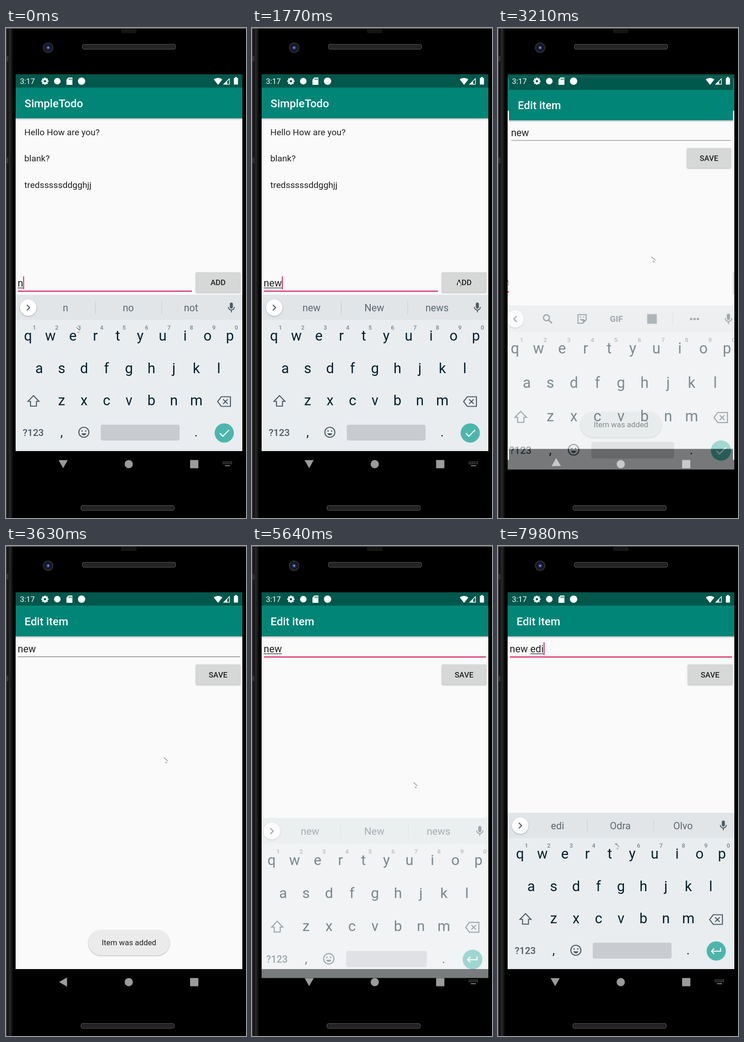
Write an HTML page with a canvas that moves like this. It is 524 px wide and 1069 px high and loops after 8 s.

```html
<!DOCTYPE html>
<html lang="en">
<head>
<meta charset="utf-8">
<title>Todo list demo</title>
<style>
html, body { margin: 0; width: 100%; height: 100%; overflow: hidden; background: #000; }
canvas { display: block; width: 524px; height: 1069px; }
</style>
</head>
<body>
<canvas id="stage" width="524" height="1069"></canvas>
<script>
const W = 524, H = 1069, LOOP = 8000, STEP = 133;
const CX = 268.5, CY = 541, KEYBOARD_Y = 111, PITCH = 49;
const INK = '#212121', KEY = '#06202c', ICON = '#4c5a63', PINK = '#d81b60', NAV = '#9b9b9b';
const ROWS = ['qwertyuiop', 'asdfghjkl', 'zxcvbnm'];

const sheet = Object.assign(document.createElement('canvas'), { width: W, height: H }).getContext('2d');
let c = document.getElementById('stage').getContext('2d');

const clamp = v => Math.max(0, Math.min(1, v));
const last = (list, t) => list.filter(e => e[0] <= t).pop();
const keyX = (row, i) => CX + PITCH * (i - (row.length - 1) / 2);

// Where the pointer rests while pressing a key.
function at(key) {
  const r = ROWS.findIndex(row => row.includes(key));
  return [keyX(ROWS[r], ROWS[r].indexOf(key)) - 4, 665 + 71 * r];
}

const addSpot = [450, 552], itemSpot = [201, 405], fieldSpot = [404, 234], spaceSpot = [288, 868];
const stops = [[0, [153, 653]], [260, at('e')], [530, at('w')], [1060, addSpot], [2040, addSpot],
  [2700, itemSpot], [2930, itemSpot], [3192, [335, 499]], [4880, fieldSpot], [5100, fieldSpot],
  [6150, spaceSpot], [6780, [130, 660]], [6920, at('e')], [7280, at('d')], [7700, at('i')],
  [LOOP - 20, [256, 649]]];

// Typing: [ms, settled text, composing text, suggestions]
const addInput = [[0, '', 'n', 'n no not'], [260, '', 'ne', 'ne new need'],
  [530, '', 'new', 'new New news'], [2030, '', '', '']];
const editInput = [[0, 'new', '', 'new New news'], [5040, '', 'new', 'new New news'],
  [6150, 'new ', '', 'phone one job'], [6870, 'new ', 'e', 'e every email'],
  [7280, 'new ', 'ed', 'ed edit edition'], [7700, 'new ', 'edi', 'edi Odra Olvo']];

function pointer(t) {
  const i = Math.max(1, stops.findIndex(s => s[0] >= t));
  const [t0, a] = stops[i - 1], [t1, b] = stops[i];
  const k = clamp((t - t0) / (t1 - t0)), e = k * k * (3 - 2 * k);
  return a.map((v, j) => v + (b[j] - v) * e);
}

function rect(x, y, w, h, color, r = 0) {
  c.fillStyle = color;
  c.beginPath();
  c.roundRect(x, y, w, h, r);
  c.fill();
}

function dot(x, y, r, color) {
  c.fillStyle = color;
  c.beginPath();
  c.arc(x, y, r, 0, 7);
  c.fill();
}

function arc(x, y, r, color, w, from = 0, to = 7) {
  c.strokeStyle = color;
  c.lineWidth = w;
  c.beginPath();
  c.arc(x, y, r, from, to);
  c.stroke();
}

function trace(pts, closed) {
  c.beginPath();
  for (let i = 0; i < pts.length; i += 2) c.lineTo(pts[i], pts[i + 1]);
  if (closed) c.closePath();
}

function poly(pts, color) {
  trace(pts, true);
  c.fillStyle = color;
  c.fill();
}

function line(pts, color, w, closed) {
  trace(pts, closed);
  c.strokeStyle = color;
  c.lineWidth = w;
  c.stroke();
}

function chevron(x, y, dir) {
  line([x - 3 * dir, y - 6, x + 3 * dir, y, x - 3 * dir, y + 6], ICON, 2.2);
}

function text(s, x, y, size, color, weight = 400, align = 'left') {
  c.font = `${weight} ${size}px Roboto, sans-serif`;
  c.textAlign = align;
  c.fillStyle = color;
  c.fillText(s, x, y);
  return c.measureText(s).width;
}

function shaded(draw) {
  c.save();
  c.shadowColor = 'rgba(0,0,0,.3)';
  c.shadowBlur = 3;
  c.shadowOffsetY = 1;
  draw();
  c.restore();
}

// Draws a whole window, scaled about (CX, cy), and blends it as one piece.
function layer(scale, cy, alpha, draw) {
  const main = c;
  c = sheet;
  c.clearRect(0, 0, W, H);
  c.save();
  c.translate(CX, cy);
  c.scale(scale, scale);
  c.translate(-CX, -cy);
  draw();
  c.restore();
  c = main;
  c.globalAlpha = alpha;
  c.drawImage(sheet.canvas, 0, 0);
  c.globalAlpha = 1;
}

function speaker(x, y) {
  rect(x, y, 205, 12, '#4b4b4b', 5);
  rect(x + 1.5, y + 1.5, 202, 9, '#1c1c1c', 4);
  for (let i = 6; i < 200; i += 3) rect(x + i, y + 3, 1, 6, '#353535');
}

function phone() {
  rect(0, 0, W, H, '#000');
  const edge = c.createLinearGradient(0, 0, 16, 0);
  ['#2c2c2c', '#101010', '#2a2a2a', '#191919', '#000'].forEach((col, i) => edge.addColorStop(i / 4, col));
  rect(0, 0, 16, H, edge);
  for (const y of [61, 283]) rect(0, y, 5, 12, '#333');
  rect(0, 0, W, 1.2, '#7c7c7c');
  rect(0, 0, 1, H, '#555');
  rect(251, 2, 34, 9, '#151515', 3);
  ['#29292b', '#10131f', '#1d2a57', '#7f95d8'].forEach((col, i) => dot(92, 43, 11.5 - 3.1 * i, col));
  speaker(166, 35);
  speaker(163, 1041);
}

function statusIcons() {
  const w = '#fff', bar = '#00574b';
  text('3:17', 30.5, 122, 16.8, w);
  for (let i = 0; i < 4; i++) {
    c.save();
    c.translate(85, 116);
    c.rotate(i * Math.PI / 4);
    rect(-1.9, -7.8, 3.8, 15.6, w, 1);
    c.restore();
  }
  arc(85, 116, 4.2, w, 3.4);
  dot(85, 116, 2.5, bar);
  dot(112, 116, 7.2, w);
  poly([136.5, 108, 145, 108, 145, 124, 132, 124, 132, 112.5], w);
  for (let x = 137; x < 144; x += 2.7) rect(x, 110, 1.4, 3.6, bar);
  dot(165, 116, 8, w);
  c.beginPath();
  c.moveTo(463, 124);
  c.arc(463, 124, 15, -2.25, -0.89);
  c.fill();
  line([475.5, 122.7, 487.7, 122.7, 487.7, 110.5], w, 1.5, true);
  poly([475, 123, 483, 115, 483, 123], w);
  rect(497.5, 109, 9, 14.5, w, 1);
  rect(500, 107, 4, 3, w);
}

function page(title) {
  rect(21, 101, 495, 880, '#000');
  rect(21, 101, 495, 822, '#fafafa');
  rect(21, 101, 495, 30, '#00574b');
  rect(21, 130, 495, 67.3, '#008577');
  const g = c.createLinearGradient(0, 197, 0, 202);
  g.addColorStop(0, 'rgba(0,0,0,.2)');
  g.addColorStop(1, 'rgba(0,0,0,0)');
  rect(21, 197.3, 495, 5, g);
  text(title, 40.6, 173, 24.1, '#fff', 500);
}

function button(label, y) {
  shaded(() => rect(414.5, y, 97, 44, '#d6d7d7', 2));
  text(label, 463, y + 28, 16.84, INK, 500, 'center');
}

function field([since, done, typing], t, base, right, focused) {
  const start = 25.5 + text(done, 25.5, base, 21.66, INK);
  const end = start + text(typing, start, base, 21.66, INK);
  if (typing) rect(start, base + 2.5, end - start, 1.3, INK);
  rect(26, base + 9, right - 26, focused ? 2.3 : 1.2, focused ? PINK : '#6f6f6f');
  if (focused && (t - since) % 1000 < 500) rect(end, base - 22, 2, 28, PINK);
}

function listPage(t) {
  page('SimpleTodo');
  const items = ['Hello How are you?', 'blank?', 'tredsssssddgghjj'];
  if (t >= 2030) items.push('new');
  items.forEach((s, i) => text(s, 40, 233.7 + 57.75 * i, 19.25, INK));
  const input = last(addInput, t);
  if (!input[2]) text('Add an Item Here!', 25.5, 564, 21.66, '#999');
  field(input, t, 564, 406, true);
  button('ADD', 533);
}

function editPage(t) {
  page('Edit item');
  field(last(editInput, t), t, 232, 511, t >= 5040);
  button('SAVE', 258.5);
}

function smile(x, y, r) {
  dot(x - 0.36 * r, y - 0.27 * r, 0.15 * r, ICON);
  dot(x + 0.36 * r, y - 0.27 * r, 0.15 * r, ICON);
  c.beginPath();
  c.arc(x, y + 0.1 * r, r / 2, 0.2, 2.94);
  c.fill();
}

function toolbar() {
  arc(113.5, 607.5, 6.2, ICON, 2.5);
  line([118, 612, 125, 619], ICON, 2.8);
  line([179, 601, 196, 601, 196, 612, 189, 619, 179, 619], ICON, 2.2, true);
  poly([189, 619, 189, 612, 196, 612], ICON);
  smile(187.5, 608.5, 9);
  text('GIF', 259, 616, 18, ICON, 700, 'center');
  rect(323, 600, 20, 20, '#66737b', 1);
  rect(376, 596, 1, 28, '#c3c9cd');
  for (let i = -1; i < 2; i++) dot(421.5 + 7 * i, 610, 2.5, ICON);
}

function strip(words) {
  rect(21, 582, 495, 55, '#e1e5e8');
  shaded(() => dot(48.5, 610, 18, '#fff'));
  chevron(48.5, 610, words ? 1 : -1);
  if (words) {
    words.split(' ').forEach((s, i) => text(s, 130 + 137 * i, 618, 21.5, '#5b6870', 400, 'center'));
    for (const x of [194.5, 339.5]) rect(x, 596, 1, 29, '#c3c9cd');
  } else toolbar();
  rect(488.7, 599, 6.6, 13, ICON, 3.3);
  arc(492, 608.5, 6.7, ICON, 2, 0, Math.PI);
  rect(491, 615, 2, 5.5, ICON);
}

function keyboard(words, enter) {
  rect(21, 582, 495, 341, '#e9edf0');
  strip(words);
  ROWS.forEach((row, r) => [...row].forEach((k, i) =>
    text(k, keyX(row, i), Math.round(682 + 70.7 * r), 31, KEY, 400, 'center')));
  for (let i = 0; i < 10; i++) text((i + 1) % 10, 62 + PITCH * i, 658, 13, '#7b868d', 500, 'center');

  line([60, 802, 72, 814.5, 66.5, 814.5, 66.5, 825, 53.5, 825, 53.5, 814.5, 48, 814.5], ICON, 2.2, true);
  line([470, 804.5, 490, 804.5, 490, 825.5, 470, 825.5, 462, 815], ICON, 2.2, true);
  for (const d of [-5, 5]) line([479 - d, 810, 479 + d, 820], ICON, 2.2);

  text('?123', 59.5, 890, 21, ICON, 500, 'center');
  text(',', 121.5, 891, 27, KEY, 400, 'center');
  text('.', 415, 891, 27, KEY, 400, 'center');
  arc(170, 882, 11, ICON, 2.2);
  smile(170, 882, 11);
  rect(207, 865.5, 172, 34.5, '#c8ccd0', 4);
  dot(476.5, 883.5, 21, '#4db6ac');
  if (enter) {
    line([486, 877, 486, 884, 467, 884], '#fff', 2.2);
    line([472, 878, 466, 884, 472, 890], '#fff', 2.2);
  } else line([467, 884, 473.5, 890.5, 487, 877], '#fff', 2.4);
}

function toast() {
  shaded(() => rect(180, 838, 177, 55, '#ebebeb', 27.5));
  text('Item was added', CX, 871, 16.84, INK, 400, 'center');
}

// turn 0: back arrow, turn 1: arrow pointing down
function navigation(turn, withSwitch, color) {
  c.save();
  c.translate(124.8, 951.3);
  c.rotate(-turn * Math.PI / 2);
  poly([-9, 0, 8.5, -10, 8.5, 10], color);
  c.restore();
  dot(268, 951.5, 9, color);
  rect(402, 942.5, 18, 18, color, 1);
  if (!withSwitch) return;
  for (let i = 0; i < 12; i++) rect(473.5 + i % 6 * 3.6, 946 + (i > 5) * 3.7, 1.7, 1.7, color);
  rect(478, 954, 11, 1.7, color);
}

function arrow(x, y) {
  c.save();
  c.translate(x, y);
  poly([0, 0, 0, 10, 2.5, 8.5, 4, 12, 6.5, 11, 5, 7.5, 8.5, 7.5], 'rgba(255,255,255,.9)');
  line([0, 0, 8.5, 7.5], '#333', 1);
  line([3, 9, 4.3, 12.3, 6.5, 11.3, 5, 8.3], '#777', 0.8);
  c.restore();
}

function draw(now) {
  const t = Math.floor((now + 40) / STEP) * STEP;
  const open = clamp((t - 2965) / 400);
  const ease = 1 - (1 - open) ** 3;
  const rise = clamp((t - 5430) / 300);
  const shown = clamp((t - 2090) / 220) * clamp((4300 - t) / 300);
  const turn = t < 4500 ? 1 - clamp((t - 3060) / 200) : clamp((t - 5250) / 200);
  const moving = open > 0 && open < 1;

  phone();
  c.save();
  c.beginPath();
  c.rect(21, 101, 495, 880);
  c.clip();
  if (open < 1) layer(1 + 0.054 * ease, CY, 1, () => listPage(t));
  if (open > 0) layer(0.85 + 0.15 * ease, CY, clamp(open / 0.35), () => editPage(t));
  if (open > 0) layer(1, CY, shown, toast);
  if (open < 1)
    layer(1 + 0.054 * ease, KEYBOARD_Y, 1 - 0.87 * open, () => keyboard(last(addInput, t)[3], false));
  if (rise > 0)
    layer(1.05 - 0.05 * rise, KEYBOARD_Y, rise, () => keyboard(last(editInput, t)[3], true));
  if (!open) layer(1, CY, shown, toast);
  statusIcons();
  navigation(turn, t < 3000 || t > 5250, moving ? '#c9c9c9' : NAV);
  c.restore();
  arrow(...pointer(t));
}

const begin = performance.now();
function tick() {
  draw((performance.now() - begin) % LOOP);
  requestAnimationFrame(tick);
}
tick();
</script>
</body>
</html>
```
